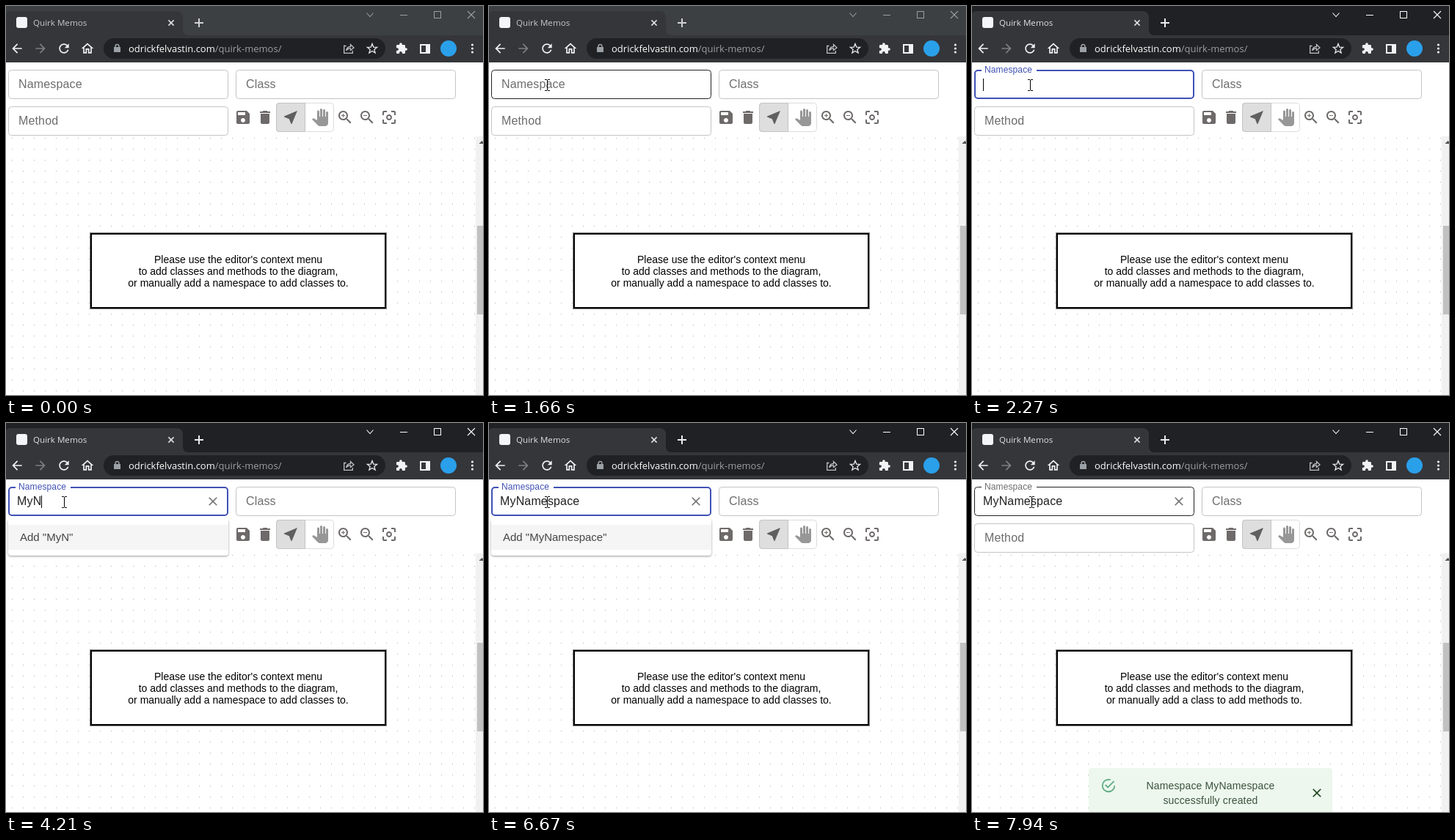
Write an HTML page with a canvas that moves like this. It is 650 px wide and 531 px high and loops after 8 s.

```html
<!DOCTYPE html>
<html lang="en">
<head>
<meta charset="utf-8">
<title>Quirk Memos</title>
<style>
html, body { margin: 0; width: 100%; height: 100%; overflow: hidden; background: #fff; }
canvas { display: block; }
</style>
</head>
<body>
<canvas id="stage" width="650" height="531"></canvas>
<script>
const ctx = document.getElementById('stage').getContext('2d');
const LOOP = 8000;
const ARIAL = '"Liberation Sans", Arial, sans-serif';
const UI = '"Open Sans", "Noto Sans", sans-serif';
const FOCUS = 1990, DONE = 6940;
const WORD = 'MyNamespace';
const KEYS = [3350, 3810, 4210, 4470, 4600, 5000, 5260, 5330, 5860, 5990, 6140];

const GLASS = 'M15.5 14h-.79l-.28-.27C15.41 12.59 16 11.11 16 9.5 16 5.91 13.09 3 9.5 3S3 5.91 3 9.5 5.91 16 9.5 16c1.61 0 3.09-.59 4.23-1.57l.27.28v.79l5 4.99L20.49 19l-4.99-5zm-6 0C7.01 14 5 11.99 5 9.5S7.01 5 9.5 5 14 7.01 14 9.5 11.99 14 9.5 14z';
const ICONS = {
  back: 'M20 11H7.83l5.59-5.59L12 4l-8 8 8 8 1.41-1.41L7.83 13H20v-2z',
  forward: 'M4 11h12.17l-5.59-5.59L12 4l8 8-8 8-1.41-1.41L16.17 13H4v-2z',
  reload: 'M17.65 6.35C16.2 4.9 14.21 4 12 4c-4.42 0-7.99 3.58-7.99 8s3.57 8 7.99 8c3.73 0 6.84-2.55 7.73-6h-2.08c-.82 2.33-3.04 4-5.65 4-3.31 0-6-2.69-6-6s2.69-6 6-6c1.66 0 3.14.69 4.22 1.78L13 11h7V4l-2.35 2.35z',
  home: 'M12 5.69l5 4.5V18h-2v-6H9v6H7v-7.81l5-4.5M12 3L2 12h3v8h6v-6h2v6h6v-8h3L12 3z',
  puzzle: 'M20.5 11H19V7c0-1.1-.9-2-2-2h-4V3.5C13 2.12 11.88 1 10.5 1S8 2.12 8 3.5V5H4c-1.1 0-1.99.9-1.99 2v3.8H3.5c1.49 0 2.7 1.21 2.7 2.7s-1.21 2.7-2.7 2.7H2V20c0 1.1.9 2 2 2h3.8v-1.5c0-1.49 1.21-2.7 2.7-2.7 1.49 0 2.7 1.21 2.7 2.7V22H17c1.1 0 2-.9 2-2v-4h1.5c1.38 0 2.5-1.12 2.5-2.5S21.88 11 20.5 11z',
  save: 'M17 3H5c-1.11 0-2 .9-2 2v14c0 1.1.89 2 2 2h14c1.1 0 2-.9 2-2V7l-4-4zm-5 16c-1.66 0-3-1.34-3-3s1.34-3 3-3 3 1.34 3 3-1.34 3-3 3zm3-10H5V5h10v4z',
  bin: 'M6 19c0 1.1.9 2 2 2h8c1.1 0 2-.9 2-2V7H6v12zM19 4h-3.5l-1-1h-5l-1 1H5v2h14V4z',
  pointer: 'M21 3L3 10.53v.98l6.84 2.65L12.48 21h.98L21 3z',
  hand: 'M23 5.5V20c0 2.2-1.8 4-4 4h-7.3c-1.08 0-2.1-.43-2.85-1.19L1 14.83s1.26-1.23 1.3-1.25c.22-.19.49-.29.79-.29.22 0 .42.06.6.16.04.01 4.31 2.46 4.31 2.46V4c0-.83.67-1.5 1.5-1.5S11 3.17 11 4v7h1V1.5c0-.83.67-1.5 1.5-1.5S15 .67 15 1.5V11h1V2.5c0-.83.67-1.5 1.5-1.5s1.5.67 1.5 1.5V11h1V5.5c0-.83.67-1.5 1.5-1.5s1.5.67 1.5 1.5z',
  zoomIn: GLASS + 'M12 10h-2v2H9v-2H7V9h2V7h1v2h2v1z',
  zoomOut: GLASS + 'M7 9h5v1H7z',
  focus: 'M5 15H3v4c0 1.1.9 2 2 2h4v-2H5v-4zM5 5h4V3H5c-1.1 0-2 .9-2 2v4h2V5zm14-2h-4v2h4v4h2V5c0-1.1-.9-2-2-2zm0 16h-4v2h4c1.1 0 2-.9 2-2v-4h-2v4zM12 8c-2.21 0-4 1.79-4 4s1.79 4 4 4 4-1.79 4-4-1.79-4-4-4zm0 6c-1.1 0-2-.9-2-2s.9-2 2-2 2 .9 2 2-.9 2-2 2z',
  close: 'M19 6.41L17.59 5 12 10.59 6.41 5 5 6.41 10.59 12 5 17.59 6.41 19 12 13.41 17.59 19 19 17.59 13.41 12z',
  tick: 'M20 12A8 8 0 0 1 12 20A8 8 0 0 1 4 12A8 8 0 0 1 12 4C12.76 4 13.5 4.11 14.2 4.31L15.77 2.74C14.61 2.26 13.34 2 12 2A10 10 0 0 0 2 12A10 10 0 0 0 12 22A10 10 0 0 0 22 12M7.91 10.08L6.5 11.5L11 16L21 6L19.59 4.58L11 13.17L7.91 10.08Z'
};
for (const k in ICONS) ICONS[k] = new Path2D(ICONS[k]);
const ARROW = new Path2D('M.5.5V16.5L4.2 12.9 6.6 18.5 9 17.4 6.6 11.9H11.5Z');

const clamp = v => Math.max(0, Math.min(1, v));
const mix = (a, b, p) => a + (b - a) * p;
const easeOut = (u, n) => 1 - Math.pow(1 - u, n);
const blend = (a, b, p) => 'rgb(' + a.map((v, i) => Math.round(mix(v, b[i], p))) + ')';

function icon(name, cx, cy, color, size = 24) {
  ctx.save();
  ctx.translate(cx - size / 2, cy - size / 2);
  ctx.scale(size / 24, size / 24);
  ctx.fillStyle = color;
  ctx.fill(ICONS[name]);
  ctx.restore();
}

function rect(x, y, w, h, color) {
  ctx.fillStyle = color;
  ctx.fillRect(x, y, w, h);
}

function round(x, y, w, h, r) {
  ctx.beginPath();
  ctx.roundRect(x, y, w, h, r);
}

function line(color, width, ...pts) {
  ctx.strokeStyle = color;
  ctx.lineWidth = width;
  ctx.beginPath();
  pts.forEach(([x, y], i) => i ? ctx.lineTo(x, y) : ctx.moveTo(x, y));
  ctx.stroke();
}

function disc(x, y, r, color) {
  ctx.fillStyle = color;
  ctx.beginPath();
  ctx.arc(x, y, r, 0, 7);
  ctx.fill();
}

function text(str, x, y, size, color, { font = ARIAL, gap = 0, align = 'left' } = {}) {
  ctx.font = size + 'px ' + font;
  ctx.letterSpacing = gap + 'px';
  ctx.textAlign = align;
  ctx.fillStyle = color;
  ctx.fillText(str, x, y);
  return ctx.measureText(str).width;
}

function cross(x, y, r, color, width) {
  line(color, width, [x - r, y - r], [x + r, y + r]);
  line(color, width, [x + r, y - r], [x - r, y + r]);
}

function drawTabs(active) {
  const ctl = active ? '#fff' : '#9a9da1';
  rect(0, 0, 650, 77, '#35363a');
  rect(0, 0, 650, 40, active ? '#202124' : '#3c4043');
  ctx.fillStyle = '#35363a';
  round(-2, 7, 243, 40, [8, 8, 0, 0]);
  ctx.fill();
  ctx.beginPath();
  ctx.moveTo(241, 32);
  ctx.quadraticCurveTo(241, 40, 249, 40);
  ctx.lineTo(241, 40);
  ctx.fill();

  ctx.fillStyle = '#f4f5f7';
  round(14, 15, 15, 15, 3);
  ctx.fill();
  text('Quirk Memos', 37, 27, 11.6, active ? '#dfe1e5' : '#c6c8cb', { font: UI });
  cross(225, 23, 3.6, '#dfe1e5', 1.5);
  const plus = active ? '#e8eaed' : '#d0d2d5';
  rect(257, 22, 12, 2, plus);
  rect(262, 17, 2, 12, plus);

  line(ctl, 1.1, [491.5, 9.5], [496, 14.5], [500.5, 9.5]);
  rect(537, 12, 10, 1, ctl);
  ctx.strokeStyle = ctl;
  ctx.lineWidth = 1;
  ctx.strokeRect(583.5, 7.5, 9, 9);
  cross(634, 12, 5, ctl, 1.1);
}

function drawToolbar() {
  const pale = '#e8eaed', dim = '#9aa0a6';
  icon('back', 15, 58, '#f1f3f4', 20);
  icon('forward', 47, 58, '#7d7f83', 20);
  icon('reload', 79, 58, '#f1f3f4', 20);
  icon('home', 111, 58, '#f1f3f4', 20);

  ctx.fillStyle = '#202124';
  round(133, 44, 384, 28, 14);
  ctx.fill();
  rect(147, 56, 9, 7, dim);
  ctx.strokeStyle = dim;
  ctx.lineWidth = 1.5;
  ctx.beginPath();
  ctx.arc(151.5, 55, 2.4, Math.PI, 0);
  ctx.lineTo(153.9, 57);
  ctx.moveTo(149.1, 55);
  ctx.lineTo(149.1, 57);
  ctx.stroke();
  const w = text('odrickfelvastin.com', 167, 63, 13, '#fff', { font: UI });
  text('/quirk-memos/', 167 + w, 63, 13, dim, { font: UI });

  line('#bdc1c6', 1.3, [463.5, 54.5], [460.7, 54.5], [460.7, 64.3], [472.3, 64.3], [472.3, 61]);
  ctx.beginPath();
  ctx.moveTo(463.7, 61);
  ctx.quadraticCurveTo(464.5, 55.5, 469.5, 55.5);
  ctx.lineTo(469.5, 52.5);
  ctx.lineTo(474, 57);
  ctx.lineTo(469.5, 60.5);
  ctx.lineTo(469.5, 58);
  ctx.quadraticCurveTo(466, 57.6, 463.7, 61);
  ctx.stroke();

  ctx.strokeStyle = pale;
  ctx.beginPath();
  for (let i = 0; i < 10; i++) {
    const a = i * Math.PI / 5 - Math.PI / 2, r = i % 2 ? 3 : 7;
    ctx.lineTo(499 + r * Math.cos(a), 58.5 + r * Math.sin(a));
  }
  ctx.closePath();
  ctx.stroke();

  icon('puzzle', 539, 58, '#f1f3f4', 17);
  ctx.strokeStyle = '#f1f3f4';
  ctx.lineWidth = 2;
  ctx.strokeRect(565, 53, 12, 11);
  rect(572, 53, 5, 11, '#f1f3f4');
  disc(603, 58, 11, '#2aa0ea');
  for (const y of [53, 58, 63]) disc(635.5, y, 1.6, '#f1f3f4');
}

function drawField(x, y, label, { hover = false, focus = false, lift = 0 } = {}) {
  const thick = focus ? 2 : 1, inset = thick / 2;
  ctx.fillStyle = '#fff';
  round(x, y, 300, 40, 4);
  ctx.fill();
  ctx.strokeStyle = focus ? '#3f51b5' : hover ? '#212121' : '#c4c4c4';
  ctx.lineWidth = thick;
  round(x + inset, y + inset, 300 - thick, 40 - thick, 4);
  ctx.stroke();
  if (lift) rect(x + 10, y, 75 * lift, 2, '#fff');
  const s = mix(1, .75, lift);
  text(label, x + 14, y + mix(25, 4, lift), 16 * s, focus ? '#3f51b5' : '#6d6d6d', { gap: .15 * s });
}

function drawIcons() {
  const grey = '#6e6a6a';
  icon('save', 323, 152, grey);
  icon('bin', 353, 152, grey);
  ctx.fillStyle = '#dedede';
  round(368, 132, 40, 40, [4, 0, 0, 4]);
  ctx.fill();
  ctx.strokeStyle = '#dcdcdc';
  ctx.lineWidth = 1;
  round(368.5, 132.5, 78, 39, 4);
  ctx.stroke();
  ctx.strokeStyle = '#c4c4c4';
  round(368.5, 132.5, 39, 39, [4, 0, 0, 4]);
  ctx.stroke();
  icon('pointer', 388, 152, '#5f5f5f');
  icon('hand', 428, 152, '#979797');
  icon('zoomIn', 462, 152, grey);
  icon('zoomOut', 492, 152, grey);
  icon('focus', 522, 152, grey);
}

function drawDiagram(created) {
  for (let y = 180; y < 531; y += 15)
    for (let x = 8; x < 640; x += 15) rect(x, y, 1, 1, '#b0b0b0');
  rect(640, 178, 10, 353, '#f1f1f1');
  rect(642, 300, 8, 121, '#c1c1c1');
  ctx.fillStyle = '#505050';
  ctx.beginPath();
  ctx.moveTo(644.5, 188);
  ctx.lineTo(648.5, 184);
  ctx.lineTo(652.5, 188);
  ctx.fill();

  rect(114, 309, 405, 105, '#8a8a8a');
  rect(115, 310, 403, 103, '#000');
  rect(117, 312, 399, 99, '#fff');
  const lines = [
    "Please use the editor's context menu",
    'to add classes and methods to the diagram,',
    created ? 'or manually add a class to add methods to.' : 'or manually add a namespace to add classes to.'
  ];
  lines.forEach((s, i) => text(s, 316.5, 351 + 16 * i, 14, '#000', { align: 'center' }));
}

function drawMenu(word) {
  ctx.save();
  ctx.shadowColor = 'rgba(0,0,0,.4)';
  ctx.shadowBlur = 3;
  ctx.shadowOffsetY = 1;
  ctx.fillStyle = '#fff';
  round(3, 131, 300, 50, 4);
  ctx.fill();
  ctx.restore();
  rect(3, 128, 300, 10, '#fff');
  rect(3, 139, 300, 34, '#f5f5f5');
  text('Add "' + word + '"', 19, 161, 15, '#454545');
}

function drawToast(t) {
  const p = easeOut(clamp((t - DONE) / 210), 2.6);
  ctx.save();
  ctx.globalAlpha = p;
  ctx.translate(325, 505);
  ctx.scale(mix(.75, 1, p), mix(.5625, 1, p));
  ctx.translate(-325, -505);
  ctx.fillStyle = '#edf7ed';
  round(159, 471, 332, 68, 4);
  ctx.fill();
  icon('tick', 186, 495, blend([92, 128, 72], [98, 174, 134], clamp((t - 7080) / 270)), 22);
  const style = { gap: .15, align: 'center' };
  text('Namespace ' + WORD, 325, 500, 14, '#3a523e', style);
  text('successfully created', 325, 520, 14, '#3a523e', style);
  icon('close', 470, 505, '#1e4620', 20);
  ctx.restore();
}

function pointerAt(t) {
  if (t < 550) return null;
  if (t < 1380) {
    const p = easeOut(clamp(Math.floor((t - 550) / 69) / 11), 1.7);
    return [Math.round(mix(577, 98, p)), Math.round(mix(518, 129, p))];
  }
  if (t < 7940) {
    const p = easeOut(clamp(Math.floor((t - 1380) / 70) / 4), 1.7);
    return [Math.round(mix(92, 79, p)), Math.round(mix(117, 108, p))];
  }
  return [81, 108];
}

function drawPointer([x, y], beam) {
  if (beam) {
    for (const dy of [-8, 7]) {
      rect(x - 3, y + dy, 3, 1, '#000');
      rect(x + 1, y + dy, 3, 1, '#000');
    }
    rect(x, y - 7, 1, 14, '#000');
    return;
  }
  ctx.save();
  ctx.translate(x, y);
  ctx.fillStyle = '#fff';
  ctx.fill(ARROW);
  ctx.strokeStyle = '#000';
  ctx.lineWidth = 1;
  ctx.stroke(ARROW);
  ctx.restore();
}

function draw(t) {
  const active = t >= FOCUS, created = t >= DONE;
  const focus = active && !created;
  const word = WORD.slice(0, KEYS.filter(k => t >= k).length);
  const pos = pointerAt(t);
  const inside = top => !!pos && pos[0] < 303 && pos[1] > top && pos[1] < top + 40;
  const overName = inside(87), overMethod = inside(137);

  rect(0, 0, 650, 531, '#fff');
  drawTabs(active);
  drawToolbar();
  drawDiagram(created);
  drawField(3, 87, 'Namespace', { hover: overName, focus, lift: easeOut(clamp((t - FOCUS) / 240), 2.6) });
  drawField(313, 87, 'Class');
  drawField(3, 137, 'Method', { hover: overMethod });
  drawIcons();
  if (word && focus) drawMenu(word);

  const w = word ? text(word, 15, 112, 16, '#212121', { gap: .15 }) : 0;
  if (word) icon('close', 282, 107, '#757575', 20);
  const caret = (t >= 2060 && t < 2600) || (t >= 3090 && t < 6670);
  if (caret) rect(15 + Math.round(w), 99, 1, 17, '#000');
  if (created) drawToast(t);
  if (pos) drawPointer(pos, overName || overMethod);
}

const start = performance.now();
function tick() {
  draw((performance.now() - start) % LOOP);
  requestAnimationFrame(tick);
}
tick();
</script>
</body>
</html>
```
